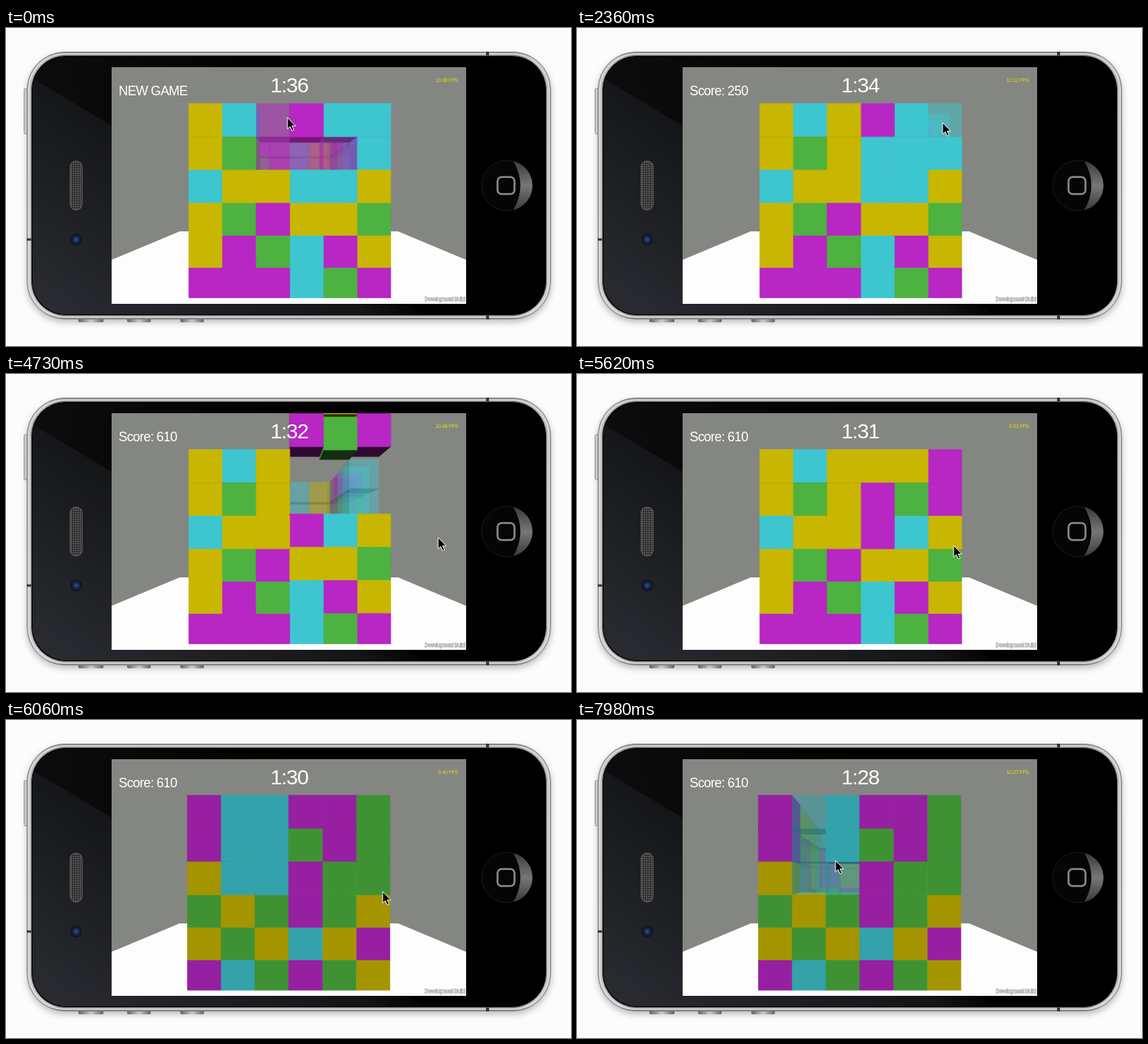
Write an HTML page with a canvas that moves like this. It is 765x430 px and loops after 8000 ms.

```html
<!DOCTYPE html>
<html lang="en">
<head>
<meta charset="utf-8">
<title>Cube game</title>
<style>
  html, body { margin: 0; width: 100%; height: 100%; overflow: hidden; background: #fcfcfc; }
  svg, canvas { position: absolute; left: 0; top: 0; }
  canvas { left: 143px; top: 53px; }
  text { font-family: "Liberation Sans", Arial, sans-serif; fill: #fff; letter-spacing: -.04em; }
</style>
</head>
<body>
<svg width="765" height="430">
  <defs>
    <linearGradient id="metal" x1="0" y1="0" x2="0" y2="1">
      <stop offset="0" stop-color="#8f8f8f"/><stop offset=".02" stop-color="#bdbdbd"/>
      <stop offset=".98" stop-color="#c8c8c8"/><stop offset="1" stop-color="#858585"/>
    </linearGradient>
    <linearGradient id="glass" gradientUnits="userSpaceOnUse" x1="60" y1="390" x2="330" y2="30">
      <stop offset="0" stop-color="#2b2c32"/><stop offset=".58" stop-color="#141517"/><stop offset=".7" stop-color="#000"/>
    </linearGradient>
    <linearGradient id="shade" x1="0" y1="0" x2="1" y2="0">
      <stop offset="0" stop-color="#0d0d0f"/><stop offset="1" stop-color="#000"/>
    </linearGradient>
    <linearGradient id="shine" x1="0" y1="0" x2="0" y2="1">
      <stop offset="0" stop-color="#3a3a3a"/><stop offset=".5" stop-color="#777"/><stop offset="1" stop-color="#3a3a3a"/>
    </linearGradient>
    <linearGradient id="key" x1="0" y1="0" x2="1" y2="0">
      <stop offset="0" stop-color="#777"/><stop offset=".5" stop-color="#f4f4f4"/><stop offset="1" stop-color="#777"/>
    </linearGradient>
    <radialGradient id="lens">
      <stop offset="0" stop-color="#35548a"/><stop offset=".45" stop-color="#16284c"/><stop offset="1" stop-color="#0a0c14"/>
    </radialGradient>
    <pattern id="mesh" width="3" height="3" patternUnits="userSpaceOnUse">
      <rect width="3" height="3" fill="#262626"/><circle cx="1.5" cy="1.5" r=".9" fill="#777"/>
    </pattern>
    <clipPath id="front"><rect x="36" y="39" width="694" height="348" rx="45"/></clipPath>
    <filter id="soft" x="-5%" y="-5%" width="110%" height="115%">
      <feDropShadow dx="0" dy="4" stdDeviation="4" flood-opacity=".25"/>
    </filter>
  </defs>
  <rect x="24.5" y="82" width="5" height="61" rx="1.5" fill="#ddd" stroke="#999"/>
  <g fill="url(#key)">
    <rect x="98" y="391" width="34" height="7" rx="2"/>
    <rect x="164" y="391" width="32" height="7" rx="2"/>
    <rect x="236" y="391" width="32" height="7" rx="2"/>
  </g>
  <rect x="28.5" y="32.5" width="709" height="361" rx="51" fill="url(#metal)" stroke="#7c7c7c" filter="url(#soft)"/>
  <rect x="31" y="35" width="704" height="356" rx="49" fill="none" stroke="#dedede" stroke-width="1.5"/>
  <path d="M650 32h4v6h-4zM650 388h4v6h-4zM28 284.500h7v3h-7z" fill="#333"/>
  <rect x="34.500" y="37.500" width="697" height="351" rx="46" fill="#000" stroke="#555"/>
  <g clip-path="url(#front)">
    <path d="M30 38H400V132H143L36 68 30 65z" fill="url(#shade)"/>
    <path d="M30 65L36 68 143 132 571 390H30z" fill="url(#glass)"/>
  </g>
  <rect x="87" y="180" width="16" height="66" rx="8" fill="url(#mesh)" stroke="#555" stroke-width="1.500"/>
  <circle cx="95" cy="286" r="8.500" fill="url(#lens)" stroke="#25262c"/>
  <circle cx="678" cy="213" r="34" fill="#050505" stroke="#1b1b1b"/>
  <path d="M687 180A34 34 0 0 1 687 246Q706 213 687 180" fill="url(#shine)"/>
  <rect x="665.500" y="201.500" width="23" height="23" rx="5.500" fill="none" stroke="#8d8d8d" stroke-width="2.500"/>
</svg>

<canvas id="scene" width="480" height="320"></canvas>

<svg width="765" height="430">
  <text id="score" x="152.500" y="90.500" font-size="17.800"></text>
  <text id="clock" x="383.500" y="86.500" font-size="28.500" text-anchor="middle"></text>
  <text id="fps" x="612" y="73" font-size="7" text-anchor="end" style="fill:#e6dc00"></text>
  <text x="621.500" y="368.500" font-size="7.100" text-anchor="end" stroke="#777" stroke-width=".8" paint-order="stroke">Development Build</text>
  <path id="cursor" d="M0 0V15.500L3.600 12.200 6.200 18 8.700 16.900 6.200 11.300H11z" fill="#000" stroke="#fff"/>
</svg>

<script>
const LOOP = 8000, STEP = 147.8;
const CAMERA = 10.55, FOCAL = 344, FLOOR = 3.333, FLOOR_HALF = 7.95;
const COLORS = { Y: [200, 182, 0], C: [62, 198, 208], M: [184, 38, 196], G: [77, 178, 64] };

// Front wall after each clearing; the lower three rows never change.
const LOWER = ['YGMYYG', 'YMGCMY', 'MMMCGM'];
const FRONTS = [
  ['YCMMCC', 'YGMMMC', 'CYYCCY'],
  ['YCYMCC', 'YGYCCC', 'CYYCCY'],
  ['YCYYYM', 'YGYMGM', 'CYYMCY'],
].map(top => top.concat(LOWER));
const RIGHT = ['MCCMMG', 'MCCGMG', 'YCCMGG', 'GYGMGY', 'YGYCYM', 'MCGMGY'];
const BACK_TOP = 'CMMCYG';

// Clearings: step, and per column [cubes removed, lowest removed row].
const CLEARS = [
  { step: 0, columns: {} },
  { step: 5, columns: { 2: [2, 1], 3: [2, 1], 4: [1, 1] } },
  { step: 30, columns: { 3: [2, 2], 4: [2, 2], 5: [2, 1] } },
];
// Picked cubes per stage: [step, column, row, depth]
const PICKS = [
  [[0, 2, 0, 0], [0, 2, 1, 0], [0, 3, 1, 0], [0, 4, 1, 0], [2, 3, 0, 0]],
  [[16, 5, 0, 0], [18, 5, 1, 0], [20, 4, 1, 0], [22, 3, 1, 0], [26, 3, 2, 0], [28, 4, 2, 0]],
  [[48, 5, 0, 1], [50, 5, 1, 1], [52, 5, 2, 1], [54, 5, 2, 2]],
];
const POINTER = [[0, 381, 121], [2, 410, 138], [5, 410, 138], [8, 429, 156], [12, 429, 156],
  [16, 495, 128], [18, 495, 160], [20, 452, 165], [24, 403, 176], [26, 405, 210], [28, 450, 214],
  [29, 450, 214], [32, 585, 221], [36, 588, 222], [38, 510, 232], [41, 510, 232], [45, 380, 140],
  [48, 312, 120], [52, 312, 200], [54, 350, 190]];
const RATES = ['10.38', '9.66', '10.12', '10.42', '10.48', '9.33', '9.40', '9.87', '10.27'];

const byId = id => document.getElementById(id);
const ctx = byId('scene').getContext('2d');
const rowTop = r => -2.434 + .974 * r + .004 * r * (5 - r);

function colorOf(i, r, k, stage) {
  if (k === 0) return FRONTS[stage][r][i];
  if (i === 5) return RIGHT[r][k];
  if (k === 5 && r === 0) return BACK_TOP[i];
  return 'YCMG'[(i * 3 + r * r + k * 5 + (r * k >> 1)) & 3];
}

// Height of a front cube above its resting place, t seconds after a clearing.
function lift(i, r, clear, t) {
  const column = clear.columns[i];
  if (!column) return 0;
  const [count, lowest] = column, fallen = 32 * t * t;
  if (r < count) {
    const start = (i % 2 ? 4.85 : 4.75) + .09 * (count - 1 - r);
    const late = t - Math.sqrt(start / 32);
    return late < 0 ? start - fallen
      : -.27 * (r ? .2 : 1) * Math.sin(18 * late) * Math.exp(-8 * late);
  }
  const bob = t < .2 ? 0 : .08 * Math.exp(5 * (.3 - t)) * Math.cos(18 * (t - .3)) * (5 - r) / 4;
  return bob + (r <= lowest ? Math.max(0, count - fallen) : 0);
}

function drawScene(n, stage, angle) {
  const sin = Math.sin(angle), cos = Math.cos(angle);
  const camX = CAMERA * sin, camZ = -CAMERA * cos;
  const view = ([x, y, z]) => [x * cos + z * sin, y, z * cos - x * sin + CAMERA];
  const trace = points => {
    ctx.beginPath();
    for (const [x, y, z] of points) ctx.lineTo(240 + FOCAL * x / z, 160 + FOCAL * y / z);
    ctx.closePath();
  };

  ctx.globalAlpha = 1;
  ctx.fillStyle = '#848682';
  ctx.fillRect(0, 0, 480, 320);

  // Floor, cut off just before the camera
  const near = .2, F = FLOOR_HALF, floor = [];
  const corners = [[-F, -F], [F, -F], [F, F], [-F, F]].map(([x, z]) => view([x, FLOOR, z]));
  corners.forEach((a, j) => {
    const b = corners[(j + 1) % 4];
    if (a[2] > near) floor.push(a);
    if ((a[2] > near) !== (b[2] > near)) {
      const f = (near - a[2]) / (b[2] - a[2]);
      floor.push([a[0] + (b[0] - a[0]) * f, FLOOR, near]);
    }
  });
  trace(floor);
  ctx.fillStyle = '#fdfdfd';
  ctx.fill();

  const clear = CLEARS[stage], since = (n - clear.step) * STEP / 1000;
  const cubes = [];
  for (let i = 0; i < 6; i++) for (let k = 0; k < 6; k++) {
    if (i % 5 && k % 5) continue;
    for (let r = 0; r < 6; r++) {
      const x = i - 2.973, z = k - 3.006, y = rowTop(r) - (k ? 0 : lift(i, r, clear, since));
      const picked = PICKS[stage].some(p => n >= p[0] && p[1] === i && p[2] === r && p[3] === k);
      const solid = (k === 0 && angle < 1.57) || (i === 5 && angle > 0);
      cubes.push({
        x, y, z, height: rowTop(r + 1) - rowTop(r),
        color: COLORS[colorOf(i, r, k, stage)],
        alpha: picked ? .5 : solid ? 1 : .42,
        far: Math.hypot(x + .5 - camX, y + .5, z + .5 - camZ),
      });
    }
  }
  cubes.sort((a, b) => b.far - a.far);

  for (const { x, y, z, height, color, alpha } of cubes) {
    const X = x + 1, Y = Math.min(y + height, FLOOR), Z = z + 1;
    const face = (visible, shade, points) => {
      if (!visible) return;
      trace(points.map(view));
      ctx.globalAlpha = alpha;
      ctx.fillStyle = ctx.strokeStyle = `rgb(${color.map(c => Math.round(c * shade))})`;
      ctx.fill();
      ctx.lineWidth = .5;
      if (alpha === 1) ctx.stroke();
    };
    face(camZ > Z, .6, [[x, y, Z], [X, y, Z], [X, Y, Z], [x, Y, Z]]);
    face(y > 0, 1, [[x, y, z], [X, y, z], [X, y, Z], [x, y, Z]]);
    face(Y < 0, .25, [[x, Y, z], [X, Y, z], [X, Y, Z], [x, Y, Z]]);
    face(camX < x, .75, [[x, y, z], [x, y, Z], [x, Y, Z], [x, Y, z]]);
    face(camX > X, .82, [[X, y, z], [X, y, Z], [X, Y, Z], [X, Y, z]]);
    face(camZ < z, 1, [[x, y, z], [X, y, z], [X, Y, z], [x, Y, z]]);
  }
}

function pointerAt(n) {
  const j = Math.max(1, POINTER.findIndex(p => p[0] >= n));
  const [n0, x0, y0] = POINTER[j - 1], [n1, x1, y1] = POINTER[j];
  const f = (n - n0) / (n1 - n0);
  return [x0 + (x1 - x0) * f, y0 + (y1 - y0) * f];
}

function render(n) {
  const stage = n < 5 ? 0 : n < 30 ? 1 : 2;
  const turn = Math.min(1, Math.max(0, (n - 38) / 3));
  drawScene(n, stage, turn * turn * (3 - 2 * turn) * Math.PI / 2);

  const second = Math.floor((n * STEP + 200) / 1000), left = 96 - second;
  byId('score').textContent = ['NEW GAME', 'Score: 250', 'Score: 610'][stage];
  byId('clock').textContent = `1:${left - 60}`;
  byId('fps').textContent = `${RATES[second]} FPS`;
  byId('cursor').setAttribute('transform', `translate(${pointerAt(n)})`);
}

let shown = -1;
function tick() {
  const n = Math.min(54, Math.floor((performance.now() % LOOP + 10) / STEP));
  if (n !== shown) render(shown = n);
  requestAnimationFrame(tick);
}
tick();
</script>
</body>
</html>
```
